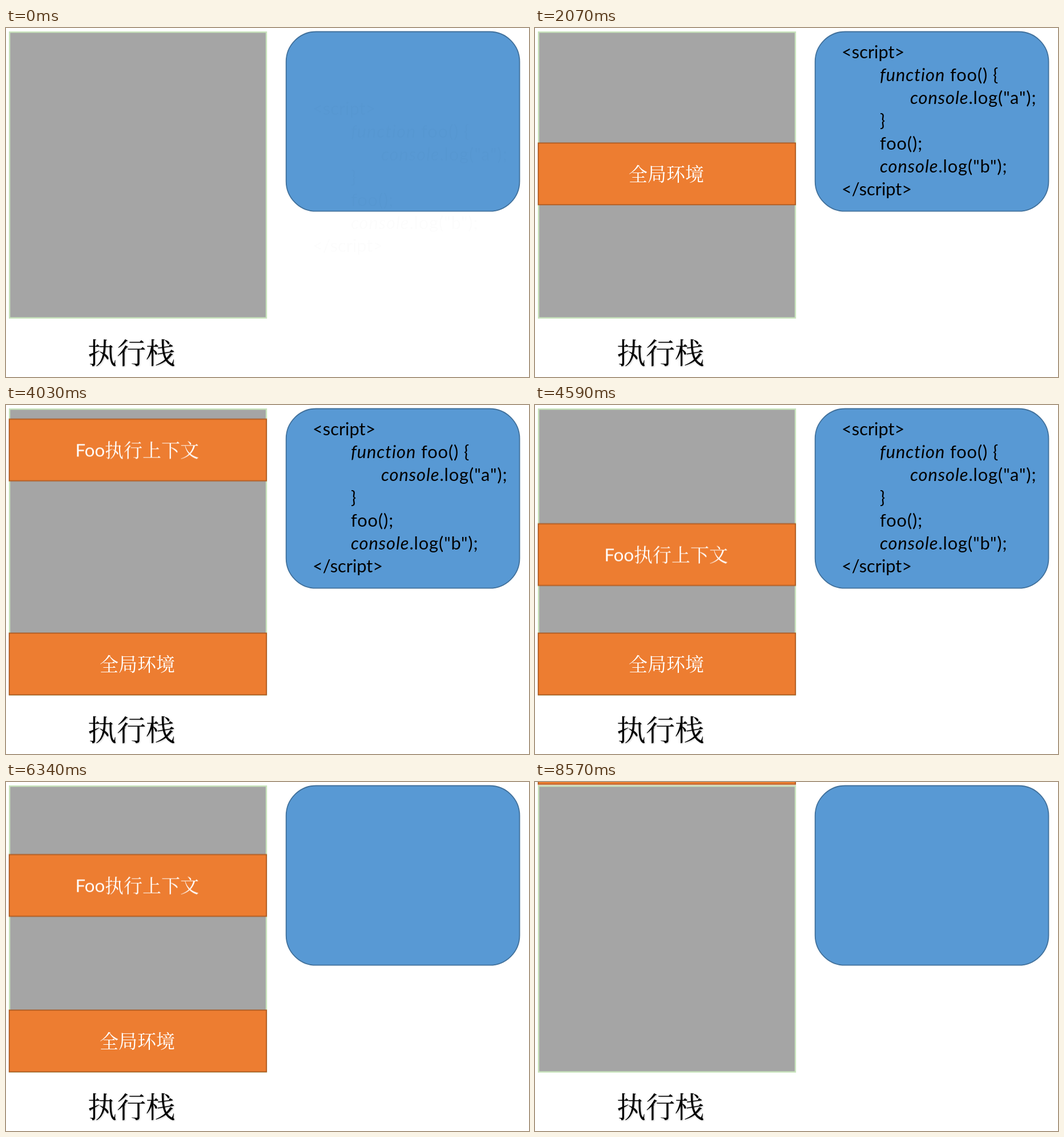
Write an HTML page that moves like this. It is 916x611 px and loops after 8.59 s.

```html
<!DOCTYPE html>
<html lang="zh-CN">
<head>
<meta charset="utf-8">
<title>执行栈</title>
<style>
  html, body { margin: 0; width: 100%; height: 100%; overflow: hidden; background: #fff; }
  svg { display: block; width: 916px; height: 611px; }
  text { font-family: Lato, "Noto Serif CJK SC", "Noto Sans CJK SC", "Noto Sans CJK", sans-serif; }

  .stack { fill: #a5a5a5; stroke: #c8e4bc; stroke-width: 2.4; }
  .panel { fill: #5899d4; stroke: #41719c; stroke-width: 1.8; }
  .title {
    font-size: 51px; font-weight: 200; fill: #000;
    filter: drop-shadow(1.5px 1.5px 1px rgba(0, 0, 0, .25));
  }

  .block rect { fill: #ed7d31; stroke: #ae5a21; stroke-width: 1.8; }
  .block text { font-size: 33px; font-weight: 200; fill: #fff; }
  .block .latin { font-size: 31.2px; font-weight: 400; }

  .code { font-size: 30.8px; fill: #000; }
  .code .body { letter-spacing: .92px; }
  .code .it { font-style: italic; }

  .code, .block { animation: 8590ms linear infinite; }
  .code { animation-name: code; }
  .global { animation-name: global; }
  .foo { animation-name: foo; }

  /* floats up while fading in, sinks while fading out */
  @keyframes code {
    0%, .873% { transform: translateY(99px); opacity: .01; }
    11.816%, 56.461% { transform: translateY(0); opacity: 1; }
    67.637%, 100% { transform: translateY(100px); opacity: 0; }
  }

  /* drops in from above, later leaves the same way */
  @keyframes global {
    0%, 15.6% { transform: translateY(-112px); }
    24.098% { transform: translateY(200.5px); }
    25.378% { transform: translateY(250px); animation-timing-function: cubic-bezier(.33, .38, .67, .95); }
    29.919%, 85.879% { transform: translateY(399px); }
    100% { transform: translateY(-112.5px); }
  }
  @keyframes foo {
    0%, 42.666% { transform: translateY(-110px); }
    46.915% { transform: translateY(24px); }
    52.852% { transform: translateY(191px); }
    56.461%, 68.393% { transform: translateY(291.5px); }
    81.607%, 100% { transform: translateY(-110px); }
  }
</style>
</head>
<body>
<svg viewBox="0 0 916 611">
  <rect class="stack" x="6.2" y="7.2" width="449.8" height="500.4"/>
  <rect class="panel" x="490.7" y="6.5" width="408.8" height="314.2" rx="52.5"/>
  <text class="title" x="143" y="588">执行栈</text>

  <g class="code">
    <text x="537" y="53">&lt;script&gt;</text>
    <g class="body">
      <text x="604" y="93"><tspan class="it">function</tspan> foo() {</text>
      <text x="657" y="133"><tspan class="it">console</tspan>.log("a");</text>
      <text x="604" y="173">}</text>
      <text x="604" y="213">foo();</text>
      <text x="604" y="253"><tspan class="it">console</tspan>.log("b");</text>
    </g>
    <text x="537" y="293">&lt;/script&gt;</text>
  </g>

  <g class="block global">
    <rect x="5.7" y=".4" width="450.5" height="108"/>
    <text x="164" y="67">全局环境</text>
  </g>
  <g class="block foo">
    <rect x="5.7" y=".4" width="450.5" height="108"/>
    <text class="latin" x="121.5" y="66">Foo</text>
    <text x="173" y="67">执行上下文</text>
  </g>
</svg>
</body>
</html>
```
